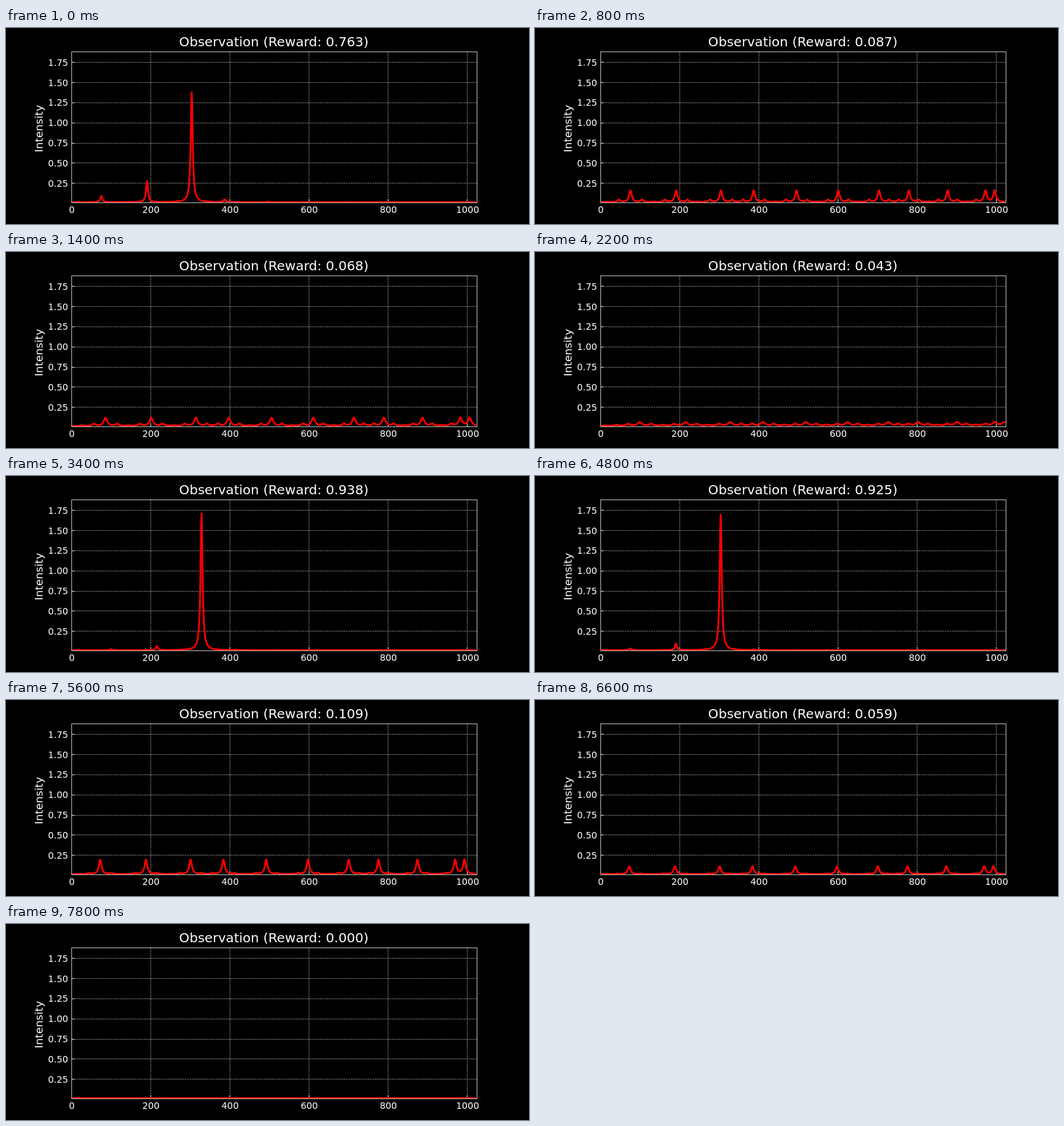
An HTML page that plays this animation: 800x300 px, repeating every 8000 ms.

```html
<!DOCTYPE html>
<html lang="en">
<head>
<meta charset="utf-8">
<title>Observation</title>
<style>
  html, body { margin: 0; width: 100%; height: 100%; overflow: hidden; background: #000; }
  svg { display: block; width: 100vw; height: 100vh; }
  text { font-family: "DejaVu Sans", sans-serif; font-size: 13.89px; fill: #fff; }
  .title { font-size: 20.08px; text-anchor: middle; }
  .label { font-size: 16.67px; text-anchor: middle; }
  .grid { stroke: #b2b2b2; stroke-width: .69; stroke-dasharray: 2.57 1.11; }
  .tick { stroke: #fff; stroke-width: .8; }
  .frame { fill: none; stroke: #bcbcbc; }
  .curve { fill: none; stroke: #f00; stroke-width: 2.78; stroke-linejoin: round; }
</style>
</head>
<body>
<svg viewBox="0 0 800 300">
  <clipPath id="plot"><rect x="100" y="36" width="620.5" height="231.5"/></clipPath>
  <g id="axes"></g>
  <path class="curve" id="curve" clip-path="url(#plot)"/>
  <rect class="frame" x="100.5" y="36.5" width="620" height="231"/>
  <text class="title" id="title" x="409.7" y="28"></text>
  <text class="label" transform="translate(56 154) rotate(-90)">Intensity</text>
</svg>
<script>
const LOOP = 8000, STEP = 200, SPAN = 1024, BASE = .015;
const TEETH = 39, FOCUS = 11;
const toX = v => 100 + v * 620 / SPAN;
const toY = v => 268.5 - v * 123.3;
const mix = (a, b, k) => a + (b - a) * k;

// A fine comb of teeth, slowly narrowing; a coarser comb picks the strong ones.
const toothX = n => 75.5 + 28.56 * (n - 3) - .084 * (n - 3) * (n - FOCUS);
const strong = Array.from({ length: 10 }, (_, k) => Math.round(3 + 3.75 * k)).concat(TEETH - 1);
const rank = n => Math.min(...strong.map(s => Math.abs(s - n)));

// side: strength of neighbours of strong teeth; spread: how far power leaks from FOCUS.
const POSES = [
  { t: 0,    reward: .763, peak: 1.365, shift: 0,    width: 3, side: 0,   spread: 1.95 },
  { t: 800,  reward: .087, peak: .145,  shift: .5,   width: 4, side: .2,  spread: Infinity },
  { t: 2200, reward: .043, peak: .046,  shift: 24,   width: 7, side: .55, spread: Infinity },
  { t: 3400, reward: .938, peak: 1.7,   shift: 24.9, width: 3, side: 0,   spread: .7 },
  { t: 4800, reward: .925, peak: 1.68,  shift: 0,    width: 3, side: 0,   spread: .9 },
  { t: 5600, reward: .109, peak: .18,   shift: -2.7, width: 4, side: .06, spread: Infinity },
  { t: 7800, reward: 0,    peak: 0,     shift: -2.7, width: 4, side: 0,   spread: Infinity }
];

function height(pose, n) {
  const distance = n < FOCUS ? FOCUS - n : 4 * (n - FOCUS);
  return pose.peak * pose.side ** rank(n) / (1 + (distance / pose.spread) ** 2);
}

function poseAt(t) {
  const next = Math.max(1, POSES.findIndex(p => p.t >= t));
  const a = POSES[next - 1], b = POSES[next];
  const k = (t - a.t) / (b.t - a.t);
  const blend = key => mix(a[key], b[key], k);
  const shift = blend("shift");
  const peaks = Array.from({ length: TEETH }, (_, n) => ({
    x: toothX(n) + shift,
    h: mix(height(a, n), height(b, n), k)
  }));
  return { reward: blend("reward"), width: blend("width"), peaks };
}

function curvePath({ peaks, width }) {
  let d = "";
  for (let x = 0; x < SPAN; x++) {
    const v = peaks.reduce((sum, p) => sum + p.h / (1 + ((x - p.x) / width) ** 2), BASE);
    d += (x ? "L" : "M") + toX(x).toFixed(2) + " " + toY(v).toFixed(2);
  }
  return d;
}

function drawAxes() {
  const line = (cls, d) => `<path class="${cls}" d="${d}"/>`;
  let out = "";
  for (let v = 0; v <= 1000; v += 200) {
    const x = Math.floor(toX(v)) + .5;
    if (v) out += line("grid", `M${x} 267.5V36`);
    out += line("tick", `M${x} 267v-4.9`);
    out += `<text x="${toX(v) + .6}" y="283" text-anchor="middle">${v}</text>`;
  }
  for (let v = .25; v < 1.8; v += .25) {
    const y = Math.floor(toY(v)) + .5;
    out += line("grid", `M100.5 ${y}H720`) + line("tick", `M100 ${y}h4.9`);
    out += `<text x="95.2" y="${Math.round(toY(v) + 5)}" text-anchor="end">${v.toFixed(2)}</text>`;
  }
  document.getElementById("axes").innerHTML = out;
}

const curve = document.getElementById("curve");
const title = document.getElementById("title");
const start = performance.now();
let shown = -1;

function render(now) {
  const step = Math.floor(Math.max(0, now - start) % LOOP / STEP);
  if (step !== shown) {
    shown = step;
    const pose = poseAt(step * STEP);
    curve.setAttribute("d", curvePath(pose));
    title.textContent = `Observation (Reward: ${pose.reward.toFixed(3)})`;
  }
  requestAnimationFrame(render);
}

drawAxes();
render(start);
</script>
</body>
</html>
```
